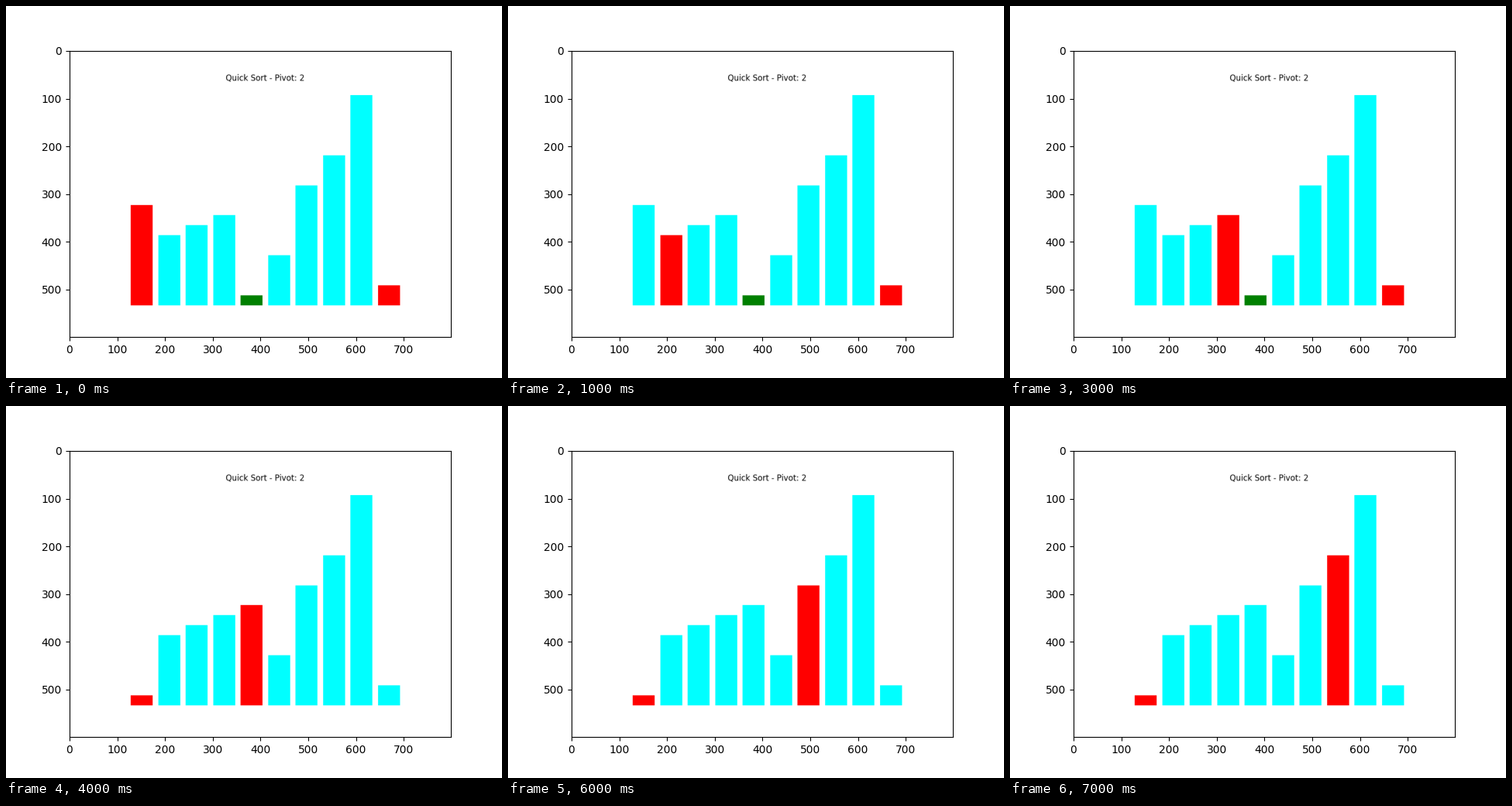
A matplotlib script that plays this animation: 640 by 480 pixels, repeating every 8 s.

```python
import numpy as np
import matplotlib.pyplot as plt
from matplotlib.animation import FuncAnimation

STEPS = 8
PIVOT = 4
VALUES = [20, 14, 16, 18, 2, 10, 24, 30, 42, 4]


def sort_state(step):
    """Return bar values and colours for one step of the partition."""
    values = VALUES.copy()
    colors = ["cyan"] * len(values)
    if step < PIVOT:
        # left pointer walks towards the pivot, right pointer waits at the end
        colors[PIVOT] = "green"
        colors[step] = colors[-1] = "red"
    else:
        # pivot value swapped to the front, scan goes on to the right
        values[0], values[PIVOT] = values[PIVOT], values[0]
        colors[0] = colors[step] = "red"
    return values, colors


def snapshot(fig, step):
    """Render the bar chart at 800 x 600 and return its pixels."""
    fig.clear()
    ax = fig.add_subplot()
    values, colors = sort_state(step)
    ax.bar(range(len(values)), values, color=colors)
    ax.set_title(f"Quick Sort - Pivot: {VALUES[PIVOT]}")
    ax.axis("off")
    fig.canvas.draw()
    return np.array(fig.canvas.buffer_rgba())


# The charts are rendered large, then shown scaled down inside the final axes.
fig = plt.figure(figsize=(8, 6), dpi=100)
charts = [snapshot(fig, step) for step in range(STEPS)]

fig.clear()
fig.set_size_inches(6.4, 4.8)
ax = fig.add_subplot()
image = ax.imshow(charts[0])


def update(step):
    image.set_data(charts[step])
    return [image]


anim = FuncAnimation(fig, update, frames=STEPS, init_func=lambda: update(0),
                     interval=1000, repeat=True, repeat_delay=0)
plt.show()
```
